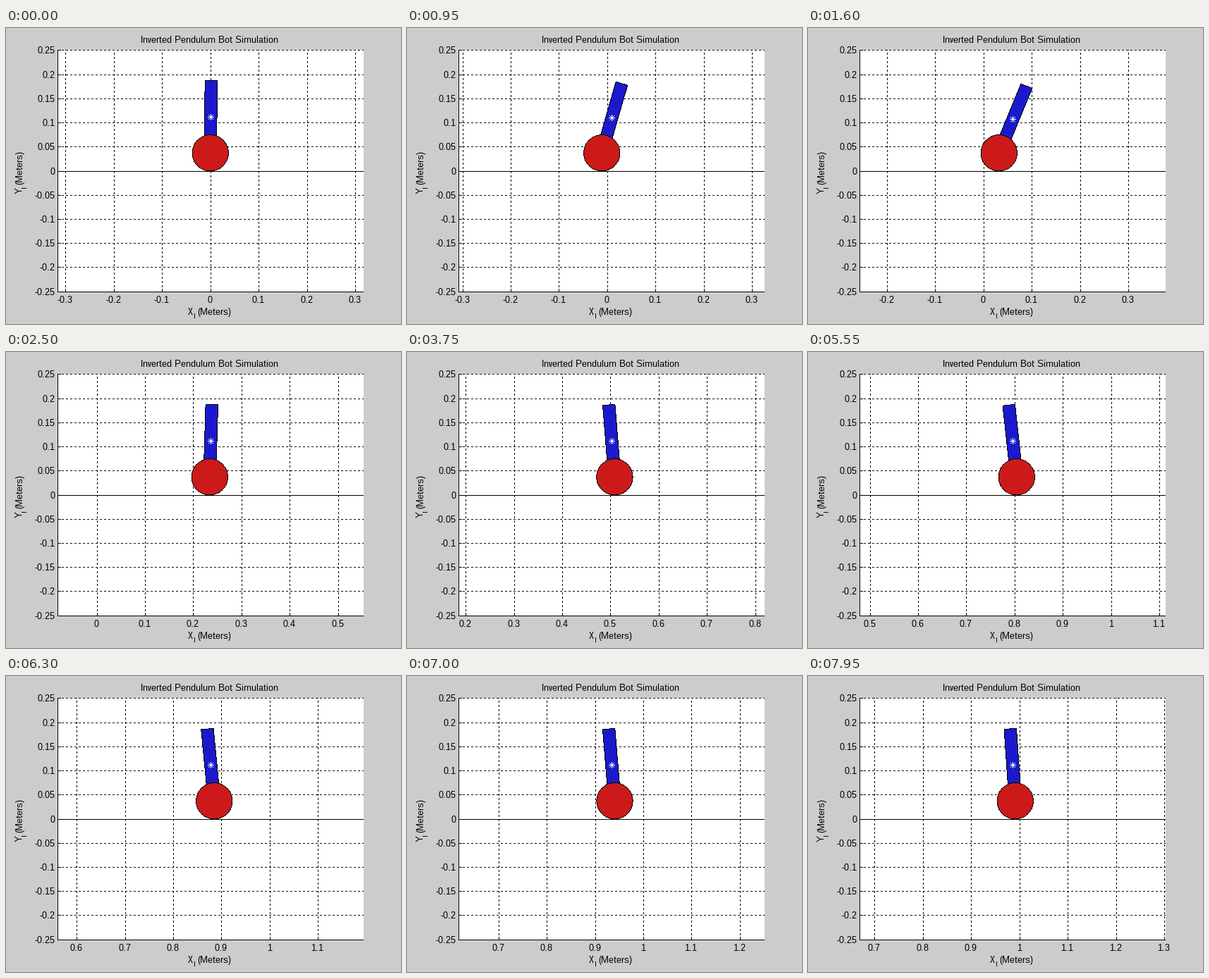
Animation, 560 px wide and 420 px high, one loop 8 s. Source, as a matplotlib script:

```python
import matplotlib.pyplot as plt
import numpy as np
from matplotlib.animation import FuncAnimation
from matplotlib.collections import LineCollection
from matplotlib.patches import Polygon, Rectangle

W, H, DPI = 560, 420, 100
STEP, FRAMES = 50, 160
PX = 72 / DPI                      # one pixel in points
LEFT, RIGHT, TOP, BOTTOM = 73, 507, 31, 374
MID_X, ZERO_Y, SCALE = 289.8, 202.52, 684.6
HALF = 0.317                       # half of the visible width, metres
RADIUS, ARM, THICK = 0.0375, 0.15, 0.0255

plt.rcParams.update({
    "font.family": "Liberation Sans",
    "font.size": 13.03 * PX,
    "text.hinting": "native",
    "text.hinting_factor": 1,
    "lines.scale_dashes": False,
})

# key poses: time (s), centre of mass (m), lean (rad)
KEYS = np.array([
    (0.45, 0, 0.012), (1.0, 0.0109, 0.30), (1.6, 0.0602, 0.39),
    (2.2, 0.1667, 0.13), (2.5, 0.2355, 0.03), (3.75, 0.502, -0.08),
    (5.55, 0.7955, -0.107), (7.0, 0.934, -0.082), (7.95, 0.9855, -0.068)])


def smooth(t, times, values):
    """Cubic curve through the keys, starting from rest."""
    slopes = np.gradient(values, times)
    slopes[0] = 0
    t = np.clip(t, times[0], times[-1])
    k = np.clip(np.searchsorted(times, t) - 1, 0, len(times) - 2)
    h = times[k + 1] - times[k]
    s = (t - times[k]) / h
    rise = s * s * (3 - 2 * s)
    return (values[k] * (1 - rise) + values[k + 1] * rise
            + h * s * (1 - s) * (slopes[k] * (1 - s) - slopes[k + 1] * s))


clock = np.arange(FRAMES) * STEP / 1000
MASS = smooth(clock, KEYS[:, 0], KEYS[:, 1])
LEAN = smooth(clock, KEYS[:, 0], KEYS[:, 2])


def centred(v):
    """Centre of the nearest pixel."""
    return np.floor(v + 0.5) + 0.5


def row(y):
    return ZERO_Y - y * SCALE


def name(v):
    return f"{round(v, 2) + 0:g}"


fig = plt.figure(figsize=(W / DPI, H / DPI), dpi=DPI, facecolor="#cccccc")
ax = fig.add_axes([0, 0, 1, 1])
ax.set_xlim(0, W)
ax.set_ylim(H, 0)
ax.axis("off")


def line(xs, ys, z=2, dotted=False):
    art, = ax.plot(xs, ys, color="k", lw=PX, zorder=z, snap=False,
                   solid_capstyle="butt", dash_capstyle="butt")
    if dotted:
        art.set_dashes([3 * PX, 3 * PX])
    return art


def label(x, y, s, ha="left", **kw):
    return ax.text(x, y, s, ha=ha, va="baseline", **kw)


def pixel_art(color, z):
    art = LineCollection([], colors=color, linewidths=PX, zorder=z)
    art.set_snap(False)
    return ax.add_collection(art, autolim=False)


def trace(points):
    """One-pixel dashes along a path, one per step of its longer direction."""
    dashes = []
    for p, q in zip(points, points[1:]):
        n = int(np.ceil(np.abs(q - p).max())) + 1
        for x, y in np.floor(np.linspace(p, q, n)):
            dashes.append([(x, y + 0.5), (x + 1, y + 0.5)])
    return dashes


ax.add_patch(Rectangle((LEFT, TOP), RIGHT - LEFT, BOTTOM - TOP,
                       fc="w", ec="none", zorder=0))

for v in np.arange(-5, 6) * 0.05:
    y = centred(row(v))
    line([LEFT, RIGHT], [y, y], z=1, dotted=True)
    line([LEFT, LEFT + 5], [y, y])
    label(69.5, y + 4.5, name(v), "right")
for y in (centred(ZERO_Y), BOTTOM + 0.5):
    line([LEFT, RIGHT], [y, y])
line([LEFT + 0.5] * 2, [TOP, BOTTOM + 1])

label(288.5, 21, "Inverted Pendulum Bot Simulation", "center")
SMALL = 10 * PX
label(258, 407, "X")
label(266, 412, "I", size=SMALL)
label(271, 407, "(Meters)")
up = dict(rotation=90, rotation_mode="anchor")
label(23, 235, "Y", **up)
label(29, 227, "I", size=SMALL, **up)
label(23, 222, "(Meters)", **up)

columns = [(line([0, 0], [BOTTOM, TOP], z=1, dotted=True),
            line([0, 0], [BOTTOM, BOTTOM - 4]),
            label(0, 390, "", "center")) for _ in range(7)]


def shape(color, z):
    fill = Polygon(np.zeros((4, 2)), fc=color, ec="none", zorder=z)
    return ax.add_patch(fill), pixel_art("k", z + 0.5)


def place(art, corners):
    fill, edge = art
    fill.set_xy(corners)
    edge.set_segments(trace(np.vstack([corners, corners[:1]])))


body, wheel = shape("#1a1acc", 4), shape("#cc1a1a", 5)
star = pixel_art("w", 6)
turn = np.linspace(0, 2 * np.pi, 40, endpoint=False)
rim = np.column_stack([np.cos(turn), np.sin(turn)]) * RADIUS * SCALE
rays = np.array([(4, 0), (0, 4), (3, 3), (3, -3)])


def draw(i):
    mass, lean = MASS[i], LEAN[i]
    first = int(np.ceil((mass - HALF) * 10))
    for k, (grid, tick, text) in enumerate(columns):
        v = (first + k) / 10
        shown = v <= mass + HALF
        x = centred(MID_X + (v - mass) * SCALE)
        for art in (grid, tick):
            art.set_xdata([x, x])
            art.set_visible(shown)
        text.set_x(x - 1)
        text.set_text(name(v) if shown else "")

    axis = np.array([np.sin(lean), -np.cos(lean)]) * SCALE * ARM
    side = np.array([np.cos(lean), np.sin(lean)]) * SCALE * THICK / 2
    hub = np.array([MID_X + 0.5 - axis[0] / 2, row(RADIUS) + 0.5])
    tip = hub + axis
    place(body, np.array([hub - side, tip - side, tip + side, hub + side]))
    place(wheel, hub + rim)

    centre = np.floor(hub + axis / 2) + 0.5
    star.set_segments([dash for ray in rays
                       for dash in trace([centre - ray, centre + ray])])
    return []


anim = FuncAnimation(fig, draw, frames=FRAMES, interval=STEP,
                     init_func=lambda: draw(0), repeat=True, repeat_delay=0)
plt.show()
```
